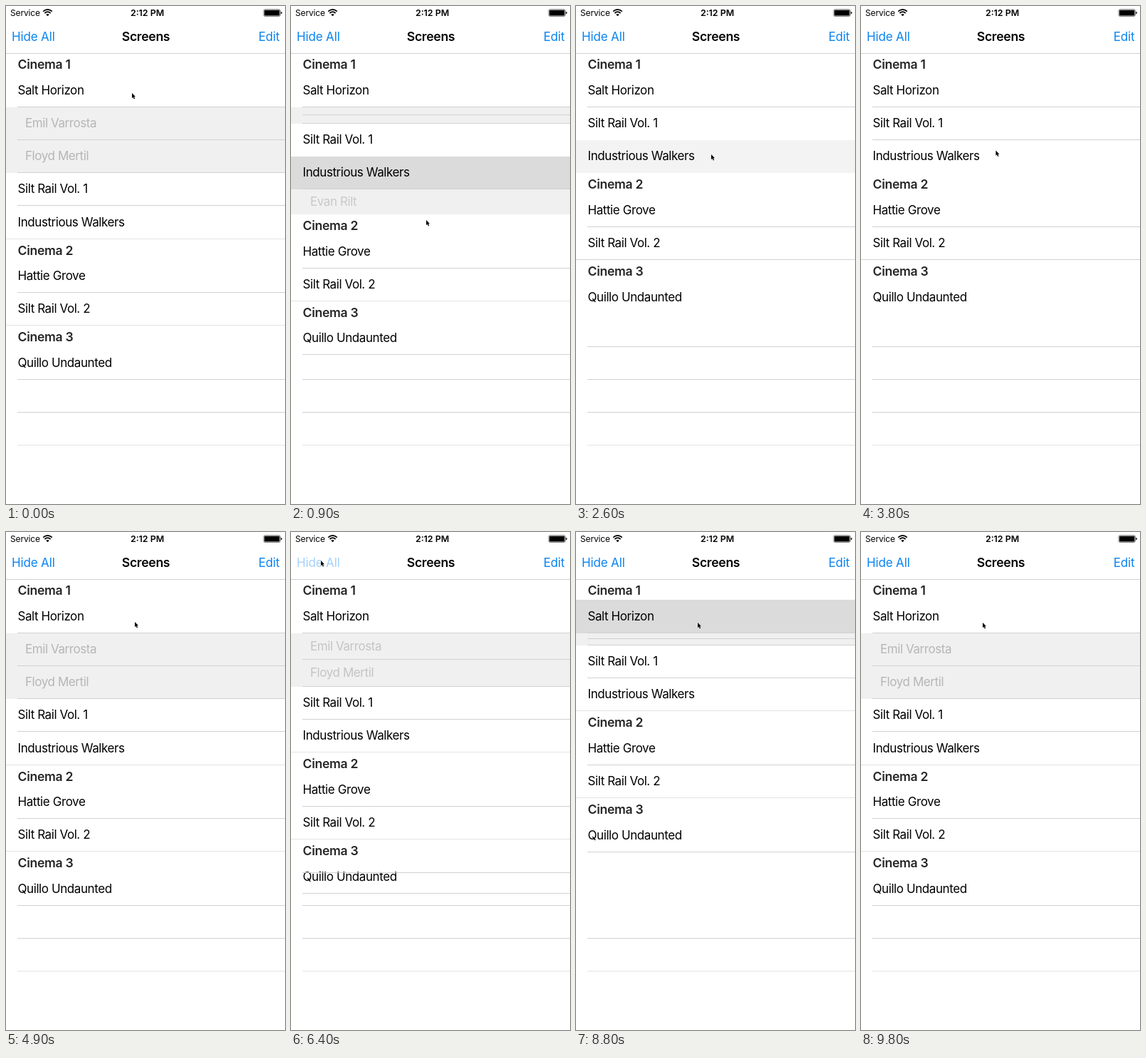
Recreate the animation shown at these times as an HTML page. Size 392 px wide and 698 px high, loop 10 s.

```html
<!DOCTYPE html>
<html lang="en">
<head>
<meta charset="utf-8">
<title>Expandable list</title>
<style>
  html, body { margin: 0; width: 100%; height: 100%; overflow: hidden; background: #fff; }
  #stage {
    position: relative; width: 392px; height: 698px; overflow: hidden; background: #fff;
    font: 400 17px/46px Inter, Roboto, sans-serif; letter-spacing: -.42px; color: #000;
  }
  #stage div, #stage svg { position: absolute; white-space: nowrap; }
  #list { inset: 0; }
  .cell { left: 0; width: 392px; overflow: hidden; }
  .cell div { left: 16.5px; height: 46px; }
  .actor { background: #f0f0f0; color: #b6b6b6; }
  .actor div { left: 27px; }
  .head div, .title { font-size: 17.6px; font-weight: 600; letter-spacing: -.3px; }
  .head { color: #262628; }
  .line { height: 1px; right: 0; background: #d1d1d4; }
  .status { top: 0; font-size: 12.4px; line-height: 19px; letter-spacing: 0; }
  .bar { top: 20px; letter-spacing: -.15px; color: #0a84f2; }
  .bar.title { left: 0; width: 393px; text-align: center; letter-spacing: -.3px; color: #000; }
</style>
</head>
<body>
<div id="stage">
  <div id="list"></div>
  <div class="status" style="left:6px;font-size:12px;letter-spacing:-.15px">Service</div>
  <svg style="left:51px;top:3px" width="15" height="12" viewBox="0 0 15 12" fill="none" stroke="#000" stroke-width="1.7">
    <path d="M1.2 4.6Q7.5 -.9 13.8 4.6M3.4 7Q7.5 3.4 11.6 7"/>
    <path d="M7.5 11.2L5.3 8.9Q7.5 7.1 9.7 8.9Z" fill="#000" stroke="none"/>
  </svg>
  <div class="status" style="left:0;width:397px;text-align:center;font-weight:600">2:12 PM</div>
  <svg style="left:361px;top:4px" width="28" height="12" viewBox="0 0 28 12">
    <rect x="1" y=".8" width="23.4" height="9.6" rx="2" fill="none" stroke="#000" stroke-width=".55"/>
    <rect x="2" y="1.8" width="21.4" height="7.6" rx="1"/>
    <path d="M25.3 3.9Q27 4.3 27 5.6T25.3 7.3Z"/>
  </svg>
  <div class="bar" id="hide" style="left:8px">Hide All</div>
  <div class="bar title">Screens</div>
  <div class="bar" style="right:7.5px">Edit</div>
  <div class="line" style="left:0;top:66px"></div>
  <svg id="cursor" style="left:0;top:0;overflow:visible" width="6" height="10">
    <path d="M0 0V7.2L1.6 5.8 2.8 8.6 4.1 8 2.9 5.3H5Z" stroke="#fff" stroke-width=".5" paint-order="stroke"/>
  </svg>
</div>
<script>
const LOOP = 10000, STEP = 100;
const ROW = 46.25, HEAD = 29.4, TOP = 65.4;

// kind, text, id
const items = [
  ['head', 'Cinema 1'],
  ['film', 'Salt Horizon', 'first'],
  ['actor', 'Emil Varrosta', 'firstCast'],
  ['actor', 'Floyd Mertil', 'firstCast'],
  ['film', 'Silt Rail Vol. 1', 'second'],
  ['film', 'Industrious Walkers', 'third'],
  ['actor', 'Evan Rilt', 'thirdCast'],
  ['head', 'Cinema 2'],
  ['film', 'Hattie Grove'],
  ['film', 'Silt Rail Vol. 2', 'end'],
  ['head', 'Cinema 3'],
  ['film', 'Quillo Undaunted', 'last']
];

// start, end, from, to
const firstOpen = [[700, 1000, 1, 0], [4415, 4715, 0, 1], [6315, 6615, 1, 0], [8715, 9015, 0, 1]];
const thirdOpen = [[700, 1000, 0, 1], [2215, 2515, 1, 0]];
const firstGlow = [[4499, 4500, 0, 1], [4500, 4800, 1, 0], [8799, 8800, 0, 1], [8800, 9100, 1, 0]];
const thirdGlow = [[799, 800, 0, 1], [2300, 2800, 1, 0]];
const hideFade = [[6299, 6300, 1, .3], [6300, 6800, .3, 1]];

// start, end, x, y
const moves = [
  [0, 600, 190, 300], [1200, 1900, 190, 208], [3700, 4300, 181, 126],
  [4900, 5500, 149, 110], [5500, 5900, 42, 40], [8100, 8400, 171, 127]
];

const clamp = v => Math.max(0, Math.min(1, v));
const ease = p => (1 - Math.cos(Math.PI * clamp(p))) / 2;

function track(table, t) {
  let v = table[0][2];
  for (const [a, b, from, to] of table) {
    if (t >= a) v = from + (to - from) * ease((t - a) / (b - a));
  }
  return v;
}

function pointer(t) {
  let x = 177, y = 122;
  for (const [a, b, tx, ty] of moves) {
    const p = ease((t - a) / (b - a));
    x += (tx - x) * p;
    y += (ty - y) * p;
  }
  return [x, y];
}

const list = document.getElementById('list');
const hide = document.getElementById('hide');
const cursor = document.getElementById('cursor');

function add(parent, cls, text = '') {
  const el = document.createElement('div');
  el.className = cls;
  el.textContent = text;
  return parent.appendChild(el);
}

const cells = items.map(([kind, text, id]) => {
  const box = add(list, 'cell ' + kind);
  return { kind, id, box, label: add(box, '', text) };
});
for (const c of cells) c.line = add(list, 'line');
const fillers = [477, 523, 569, 615].map(y => {
  const el = add(list, 'line');
  el.style.cssText = `left:16px;top:${y}px`;
  if (y === 615) el.style.background = '#e4e4e6';
  return { y, el };
});

function draw(time) {
  const t = Math.floor(time % LOOP / STEP) * STEP;
  const open = { firstCast: track(firstOpen, t), thirdCast: track(thirdOpen, t) };
  const glow = { first: track(firstGlow, t), third: track(thirdGlow, t) };
  const { firstCast, thirdCast } = open;
  let y = TOP;

  for (const { kind, id, box, label, line } of cells) {
    const shown = kind === 'actor' ? open[id] : 1;
    const top = Math.floor(y) + 1;
    y += kind === 'head' ? HEAD : ROW * shown;
    const bottom = Math.floor(y);
    const h = Math.max(0, bottom + 1 - top);
    box.style.top = top + 'px';
    box.style.height = h + 'px';
    label.style.top = (kind === 'head' ? -7 : Math.round((h - 48) / 2)) + 'px';

    if (kind === 'actor') label.style.opacity = clamp((shown - .25) / .75);
    if (kind === 'film') box.style.background = `rgba(0,0,0,${.14 * (glow[id] || 0)})`;

    const sectionEnd = id === 'end' || id === 'third' && !thirdCast;
    const hidden = kind === 'head' || id === 'thirdCast' || !shown ||
      id === 'second' && glow.third > 0 ||
      id === 'third' && !thirdCast && t >= 2500 && t < 4500 ||
      id === 'last' && !firstCast && !thirdCast;
    line.style.display = hidden ? 'none' : '';
    line.style.top = bottom + 'px';
    line.style.left = sectionEnd ? '0' : '16px';
    line.style.background = sectionEnd && firstCast ? '#e4e4e6' : '';
  }

  // empty rows follow the layout the list is heading for
  const rest = t < 800 || t >= 4500 && t < 6400 || t >= 8800 ? 524 : t < 2300 ? 478 : 431;
  for (const f of fillers) f.el.style.display = f.y > rest ? '' : 'none';

  hide.style.opacity = track(hideFade, t);
  const [px, py] = pointer(t);
  cursor.style.transform = `translate(${px}px,${py}px)`;
}

const start = performance.now();
function tick() {
  draw(performance.now() - start);
  requestAnimationFrame(tick);
}
tick();
</script>
</body>
</html>
```
